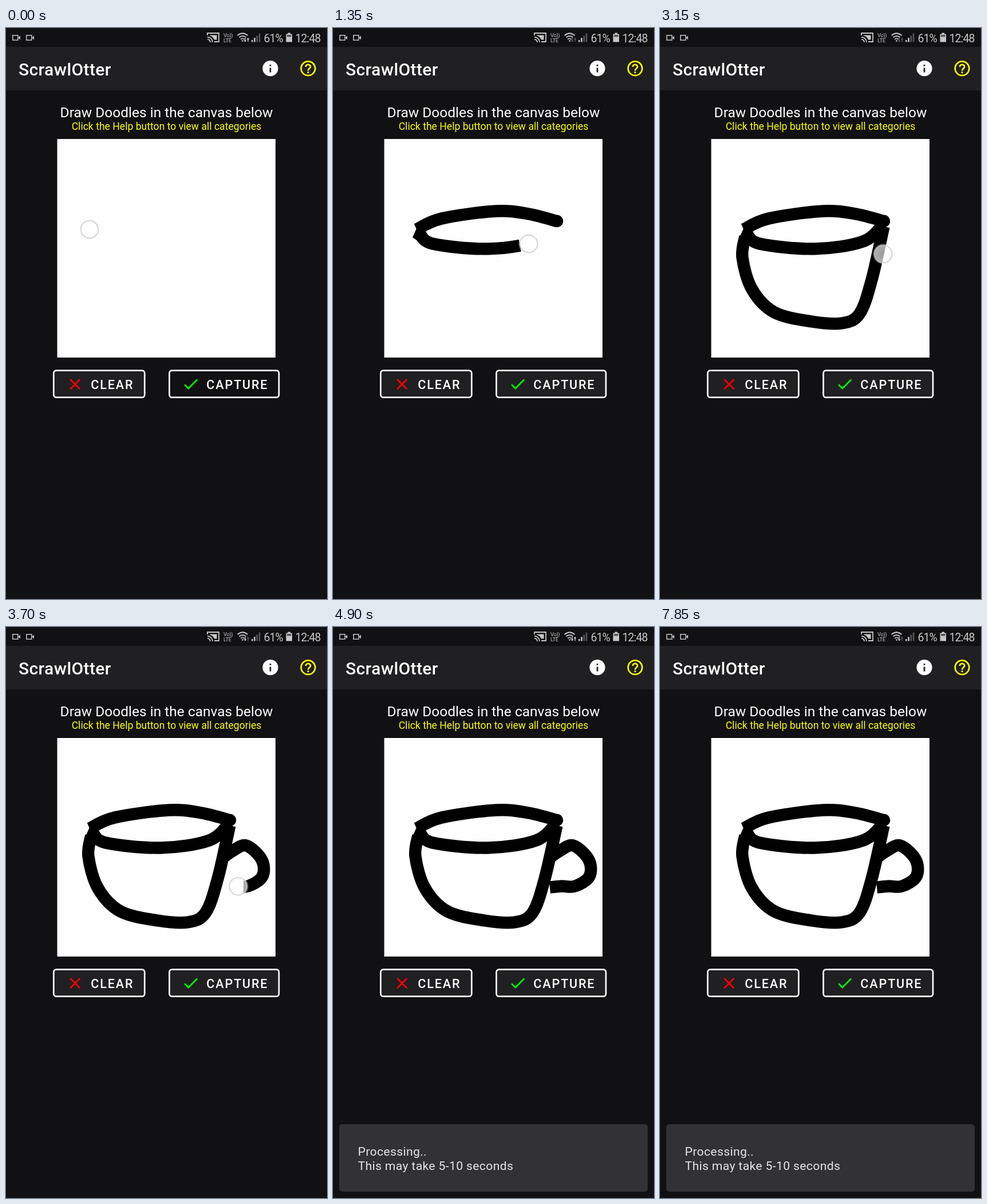
These frames come from a looping animation (561 by 998 pixels, 8 s). An HTML page:

```html
<!DOCTYPE html>
<html lang="en">
<head>
<meta charset="utf-8">
<title>Doodle canvas</title>
<style>
html, body { margin: 0; width: 100%; height: 100%; overflow: hidden; background: #111012; }
svg { display: block; width: 100vw; height: 100vh; font-family: Roboto, sans-serif; }
.mid { text-anchor: middle; }
.btn { font-weight: 500; font-size: 21.6px; letter-spacing: 1.85px; fill: #fff; }
.stat { font-size: 19.5px; letter-spacing: -.9px; fill: #c8c8c8; }
.tiny { font-size: 9.5px; letter-spacing: -.4px; fill: #c4c4c4; }
.box { fill: #201f21; stroke: #fff; stroke-width: 2.7; }
.icon { fill: none; stroke-width: 2; }
</style>
</head>
<body>
<svg viewBox="0 0 561 998" preserveAspectRatio="none">
  <defs>
    <radialGradient id="glow">
      <stop offset="0" stop-color="#fff" stop-opacity=".6"/>
      <stop offset=".72" stop-color="#fff" stop-opacity=".68"/>
      <stop offset="1" stop-color="#fff" stop-opacity="0"/>
    </radialGradient>
    <g id="cam" fill="none" stroke="#bdbdbd" stroke-width="1.6">
      <rect x=".8" y=".8" width="9" height="8.4"/>
      <path d="M10 5 14 1.5V8.5Z" fill="#bdbdbd" stroke="none"/>
    </g>
    <path id="arrow" d="M-.7 -3.5H.7V.5H2.4L0 3.5 -2.4 .5H-.7Z" fill="#d8d8d8"/>
  </defs>
  <rect width="561" height="998" fill="#111012"/>
  <rect y="33" width="561" height="76" fill="#201f21"/>

  <!-- status bar -->
  <use href="#cam" x="11" y="12"/>
  <use href="#cam" x="35" y="12"/>
  <g fill="none" stroke="#c8c8c8" stroke-width="1.8">
    <path d="M352 13V9H372V24H364M352 16A9 9 0 0 1 361 25M352 19.8A5 5 0 0 1 357 25"/>
    <path d="M356 12.5H368.5V20.5H364Q361 14 356 13.5Z" fill="#c8c8c8" stroke="none"/>
    <path d="M404.500 13Q413.500 5.500 422.500 13M407.500 16.500Q413.500 11.500 419.500 16.500M410.200 19.800Q413.500 17 416.500 19.800"/>
    <path d="M411.500 21.500H415.500L413.500 24.500Z" fill="#c8c8c8" stroke="none"/>
  </g>
  <use id="down" href="#arrow" transform="translate(418 21)"/>
  <use id="up" href="#arrow" transform="translate(423 20.500) rotate(180)"/>
  <text class="tiny" x="380" y="16">Vo))</text>
  <text class="tiny" x="380" y="25">LTE</text>
  <g id="bars" fill="#c8c8c8"></g>
  <path d="M492.500 8.500h4.500v2h3v14h-10.500v-14h3z" fill="#c8c8c8"/>
  <rect x="491" y="12" width="7.500" height="3.500" fill="#555"/>
  <text class="stat" x="450.500" y="25">61%</text>
  <text class="stat" x="505.500" y="25">12:48</text>

  <!-- header -->
  <text x="22" y="83" font-size="30" font-weight="500" letter-spacing=".38" fill="#fff">ScrawlOtter</text>
  <circle cx="462" cy="70.700" r="13.600" fill="#fff"/>
  <path d="M462 64V66.700M462 69.400V77.500" stroke="#201f21" stroke-width="2.700"/>
  <g class="icon" stroke="#ff0" transform="translate(528 70.700) scale(1.364)">
    <circle r="9"/>
    <path d="M-3 -2A3 3 0 0 1 3 -2C3 0 0 0 0 3M0 4V6"/>
  </g>
  <text class="mid" x="280.500" y="155.500" font-size="24.500" fill="#fff">Draw Doodles in the canvas below</text>
  <text class="mid" x="280.500" y="177.500" font-size="17.600" fill="#ff0">Click the Help button to view all categories</text>

  <!-- canvas -->
  <rect x="89.500" y="194" width="381.500" height="382" fill="#fefefe"/>
  <g id="ink" fill="none" stroke="#000" stroke-width="21.400" stroke-linejoin="round"></g>
  <circle id="dot" cx="391.500" cy="337.500" r="10.700"/>
  <path id="nib" d="M142 342 147 348 139 366 149 373 162 364Z"/>

  <!-- buttons -->
  <rect class="box" x="83.300" y="598.700" width="159" height="47" rx="4.500"/>
  <rect class="box" id="cap" x="285.500" y="598.700" width="191.500" height="47" rx="4.500"/>
  <rect id="ripple" x="287" y="600" width="188.500" height="44.400" rx="3" fill="#fff"/>
  <path class="icon" stroke="#f00" transform="translate(120.700 622.600) scale(1.364)" d="M-6.300 -6.300 6.300 6.300M6.300 -6.300 -6.300 6.300"/>
  <path class="icon" stroke="#0f0" transform="translate(318.800 630) scale(1.364)" d="M-4.900 -4.900 0 0 11.300 -11.300"/>
  <text class="btn" x="148.300" y="630.500">CLEAR</text>
  <text class="btn" x="350.300" y="630.500">CAPTURE</text>

  <g id="snack">
    <rect x="11" y="869" width="539" height="118" rx="5" fill="#323133"/>
    <g font-size="21.100" letter-spacing=".375" fill="#e6e6e6">
      <text x="43.500" y="924">Processing..</text>
      <text x="43.500" y="948.500">This may take 5-10 seconds</text>
    </g>
  </g>
  <g id="touch">
    <circle r="19" fill="url(#glow)"/>
    <circle id="rim" r="15.300" fill="none" stroke="#c9c9d2" stroke-opacity=".8" stroke-width="2"/>
  </g>
</svg>
<script>
const LOOP = 8000, LAG = 35, FADE = 150;
const el = id => document.getElementById(id);
const ramp = (t, a, b) => Math.min(1, Math.max(0, (t - a) / (b - a)));
const show = (node, o) => node.setAttribute('opacity', o);

function add(parent, tag, attrs) {
  const node = document.createElementNS('http://www.w3.org/2000/svg', tag);
  for (const k in attrs) node.setAttribute(k, attrs[k]);
  el(parent).append(node);
  return node;
}

for (let i = 0; i < 4; i++) {
  const h = 3.5 + 3.8 * i;
  add('bars', 'rect', { x: 429 + 4.25 * i, y: 24.5 - h, width: 2.5, height: h, opacity: i < 2 ? 1 : .4 });
}

// a finger stroke at even speed: start, end, key points
const strokes = [
  [40, 650, 'M146 352 190 333 285 320 342 325 392 338'],
  [900, 1490, 'M151 358 174 377 270 386 355 373 391 342'],
  [1750, 2900, 'M149 364 144 401 161 457 200 497 265 513 318 516 349 499 370 440 391 347'],
  [3090, 3800, 'M377 405 395 392 420 382 447 407 448 436 423 453 400 453 379 455']
].map(([start, end, points]) => {
  const path = add('ink', 'path', { d: smooth(points) });
  return { start, end, path, len: path.getTotalLength() };
});

// smooth curve through the key points
function smooth(points) {
  const n = points.slice(1).split(' ').map(Number);
  const p = n.flatMap((x, i) => i % 2 ? [] : [[x, n[i + 1]]]);
  let d = 'M' + p[0];
  for (let i = 0; i < p.length - 1; i++) {
    const a = p[i - 1] || p[i], b = p[i], c = p[i + 1], e = p[i + 2] || c;
    const c1 = [0, 1].map(k => b[k] + (c[k] - a[k]) / 6);
    const c2 = [0, 1].map(k => c[k] - (e[k] - b[k]) / 6);
    d += 'C' + [c1, c2, c].join(' ');
  }
  return d;
}

function moveTouch(x, y, alpha) {
  el('touch').setAttribute('transform', `translate(${x} ${y})`);
  show(el('touch'), alpha);
}

function draw(t) {
  show(el('touch'), 0);
  for (const { start, end, path, len } of strokes) {
    const drawn = ramp(t - LAG, start, end) * len;
    path.setAttribute('visibility', drawn > 0 ? 'visible' : 'hidden');
    path.setAttribute('stroke-dasharray', drawn >= len ? 'none' : `${drawn} ${len + 9}`);
    if (t >= start - 40 && t < end + FADE) {
      const p = path.getPointAtLength(ramp(t, start, end) * len);
      moveTouch(p.x, p.y, 1 - ramp(t, end, end + FADE));
    }
  }
  show(el('dot'), t >= strokes[0].end + LAG ? 1 : 0);
  show(el('nib'), t >= strokes[1].start + LAG ? 1 : 0);

  // capture button: enabled, then pressed
  el('cap').setAttribute('fill-opacity', ramp(t, 60, 200));
  show(el('ripple'), .05 * ramp(t, 4100, 4250) * (1 - ramp(t, 4450, 4850)));
  const press = t >= 4100 && t < 4500;
  show(el('rim'), press ? .25 : 1);
  if (press) moveTouch(424, 625, .68 * ramp(t, 4070, 4130) * (1 - ramp(t, 4380, 4500)));

  const k = ramp(t, 4500, 4650), size = .8 + .2 * (1 - (1 - k) ** 3);
  show(el('snack'), k);
  el('snack').setAttribute('transform', `translate(280.5 928) scale(${size}) translate(-280.5 -928)`);

  // network activity, refreshed every 1050 ms
  const tick = Math.floor((t + 550) / 1050);
  show(el('down'), tick === 0 || tick > 3 ? 1 : .4);
  show(el('up'), tick === 0 || (tick > 4 && tick % 2) ? 1 : .4);
}

function frame(now) {
  draw(now % LOOP);
  requestAnimationFrame(frame);
}
draw(0);
requestAnimationFrame(frame);
</script>
</body>
</html>
```
